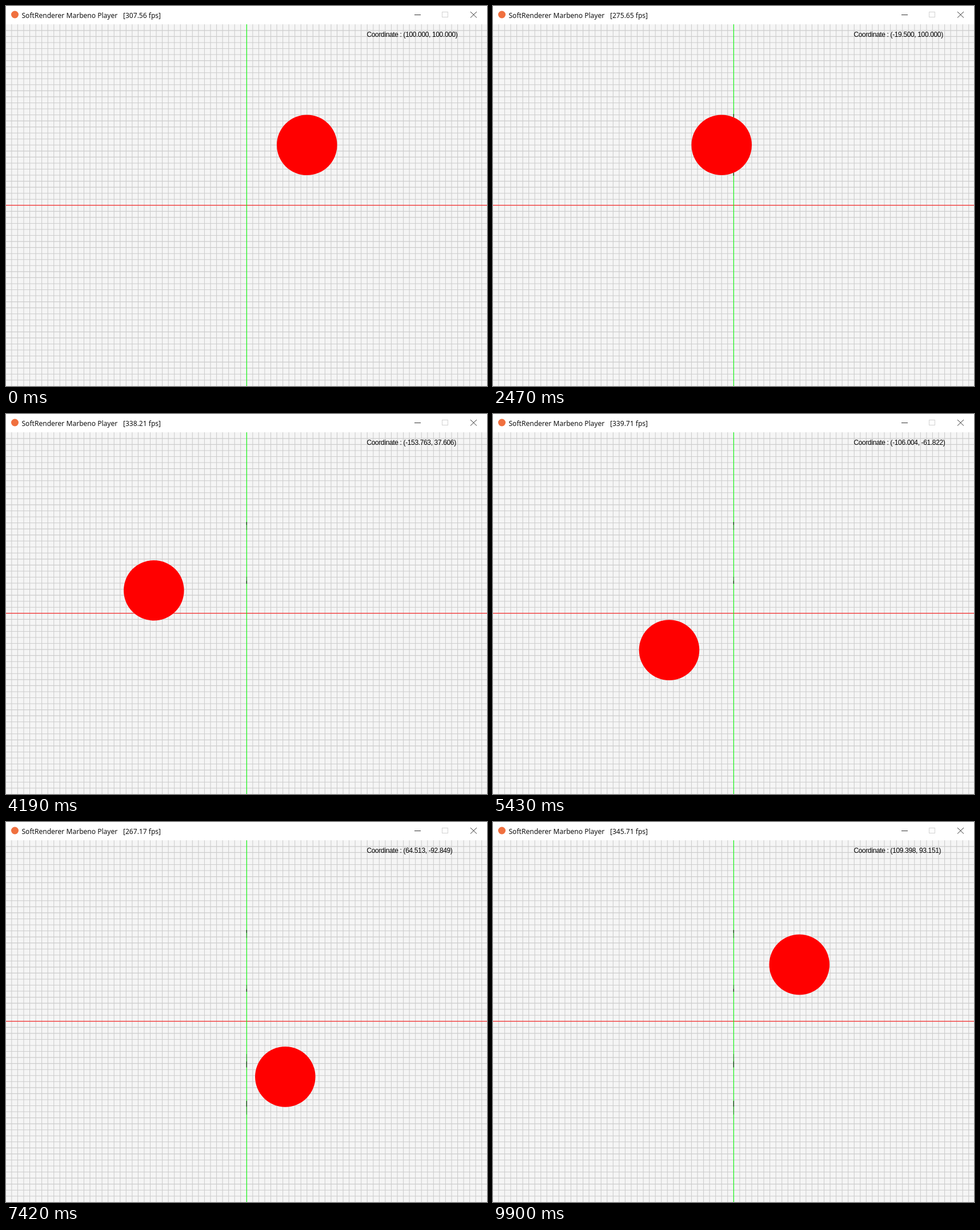
An HTML page that plays this animation: 842x665 px, repeating every 9950 ms.

```html
<!DOCTYPE html>
<html lang="en">
<head>
<meta charset="utf-8">
<title>Circle on a grid</title>
<style>
  html, body { margin: 0; width: 100%; height: 100%; overflow: hidden; background: #fff; }
  svg { display: block; width: 842px; height: 665px; }
  .crisp { shape-rendering: crispEdges; }
  .title { font: 12.05px "Noto Sans", sans-serif; fill: #111; }
  .coord { font: 12px "Liberation Sans", Arial, sans-serif; letter-spacing: -.36px; }
</style>
</head>
<body>
<svg viewBox="0 0 842 665">
  <rect y="32" width="842" height="633" fill="#f5f5f5" class="crisp"/>
  <path id="grid" stroke="#ccc"/>
  <path id="axisX" stroke="#f00"/>
  <path id="axisY" stroke="#0f0"/>
  <g stroke="#102810">
    <g id="upperMarks">
      <path d="M421.3 189v14M421.3 285v12" opacity=".5"/>
      <path d="M421.3 189v5M421.3 292v5"/>
    </g>
    <g id="lowerMarks">
      <path d="M421.3 406v24M421.3 488v24" opacity=".5"/>
      <path d="M421.3 419v10M421.3 488v10"/>
    </g>
  </g>
  <circle id="ball" r="52.8" fill="#f00"/>
  <text id="coord" class="coord" x="631.5" y="54"></text>

  <circle cx="15.5" cy="15" r="6.5" fill="#f0703f"/>
  <text class="title" x="27.5" y="21">SoftRenderer Marbeno Player</text>
  <text id="fps" class="title" x="205" y="21"></text>
  <rect x="715" y="15" width="11" height="1" fill="#333" class="crisp"/>
  <rect x="763.5" y="10.5" width="10" height="9" fill="none" stroke="#d2d2d2"/>
  <path d="M813 10l11 10.500M824 10l-11 10.500" stroke="#333" fill="none"/>
</svg>
<script>
  const LOOP = 9950;
  const UNIT = 1.055;      // screen pixels per grid unit
  const CELL = 10 * UNIT;
  const CENTER = { x: 421.3, y: 348.8 };
  const TOP = 32;
  const $ = id => document.getElementById(id);

  // The ball steps evenly, about every 69 ms, between these moments
  const CLOCK = [1320, 2470, 4400, 9970];
  const STEP = 69;

  // Waypoints [x, y, ms]; those without a time are passed at constant speed
  const PATH = [
    [100, 100, 1245], [-19.5, 100, 2470],
    [-103.5, 100], [-153.763, 49.737], [-153.763, 37.606, 4190],
    [-153.763, -14.063], [-106.004, -61.822, 5430],
    [-63.426, -104.4], [52.962, -104.4], [64.513, -92.849, 7420],
    [125.881, -31.481, 8310],
    [153.8, -3.562], [153.8, 48.749], [109.398, 93.151, 9900]
  ];

  function fillTimes(path) {
    const travelled = [0];
    for (let i = 1; i < path.length; i++) {
      const [x0, y0] = path[i - 1], [x1, y1] = path[i];
      travelled[i] = travelled[i - 1] + Math.hypot(x1 - x0, y1 - y0);
    }
    let last = 0;
    path.forEach((point, i) => {
      if (point[2]) { last = i; return; }
      const next = path.findIndex((p, j) => j > i && p[2]);
      const share = (travelled[i] - travelled[last]) / (travelled[next] - travelled[last]);
      point[2] = path[last][2] + share * (path[next][2] - path[last][2]);
      last = i;
    });
  }

  function stepTime(t) {
    if (t < CLOCK[0]) return 0;
    const i = CLOCK.findLastIndex(start => start <= t);
    const start = CLOCK[i], span = CLOCK[i + 1] - start;
    const size = span / Math.round(span / STEP);
    const moment = n => start + Math.floor(n * size / 10) * 10;
    const n = Math.floor((t - start) / size);
    return moment(n + 1) <= t ? moment(n + 1) : moment(n);
  }

  function positionAt(t) {
    const next = PATH.findIndex(point => point[2] > t);
    if (next <= 0) return next ? PATH.at(-1) : PATH[0];
    const [x0, y0, t0] = PATH[next - 1], [x1, y1, t1] = PATH[next];
    const k = (t - t0) / (t1 - t0);
    return [x0 + (x1 - x0) * k, y0 + (y1 - y0) * k];
  }

  // The frame rate is refreshed twice a second and sways around 310
  function fpsAt(t) {
    const k = Math.max(0, Math.floor((t - 330) / 495));
    return 309.6 - 43 * Math.sin(0.546 * k + 0.04746);
  }

  function drawLines() {
    const vertical = k => `M${CENTER.x + k * CELL} ${TOP}V665`;
    const horizontal = k => `M0 ${CENTER.y + k * CELL}H842`;
    let d = "";
    for (let k = -40; k < 40; k++) d += vertical(k);
    for (let k = -29; k < 30; k++) d += horizontal(k);
    $("grid").setAttribute("d", d);
    $("axisX").setAttribute("d", horizontal(0));
    $("axisY").setAttribute("d", vertical(0));
    document.querySelectorAll("#grid, #axisX, #axisY")
      .forEach(line => line.setAttribute("stroke-width", UNIT));
  }

  function render(now) {
    const t = now % LOOP;
    const shown = stepTime(t);
    const [x, y] = positionAt(shown);
    $("ball").setAttribute("cx", CENTER.x + Math.floor(x) * UNIT);
    $("ball").setAttribute("cy", CENTER.y + Math.floor(-y) * UNIT);
    $("coord").textContent = `Coordinate : (${x.toFixed(3)}, ${y.toFixed(3)})`;
    $("fps").textContent = `[${fpsAt(shown || t).toFixed(2)} fps]`;
    // Traces stay on the axis where the ball has crossed it
    $("upperMarks").style.display = shown > 2250 ? "" : "none";
    $("lowerMarks").style.display = shown > 6680 ? "" : "none";
  }

  fillTimes(PATH);
  drawLines();
  const begin = performance.now();
  function tick() {
    render(performance.now() - begin);
    requestAnimationFrame(tick);
  }
  tick();
</script>
</body>
</html>
```
